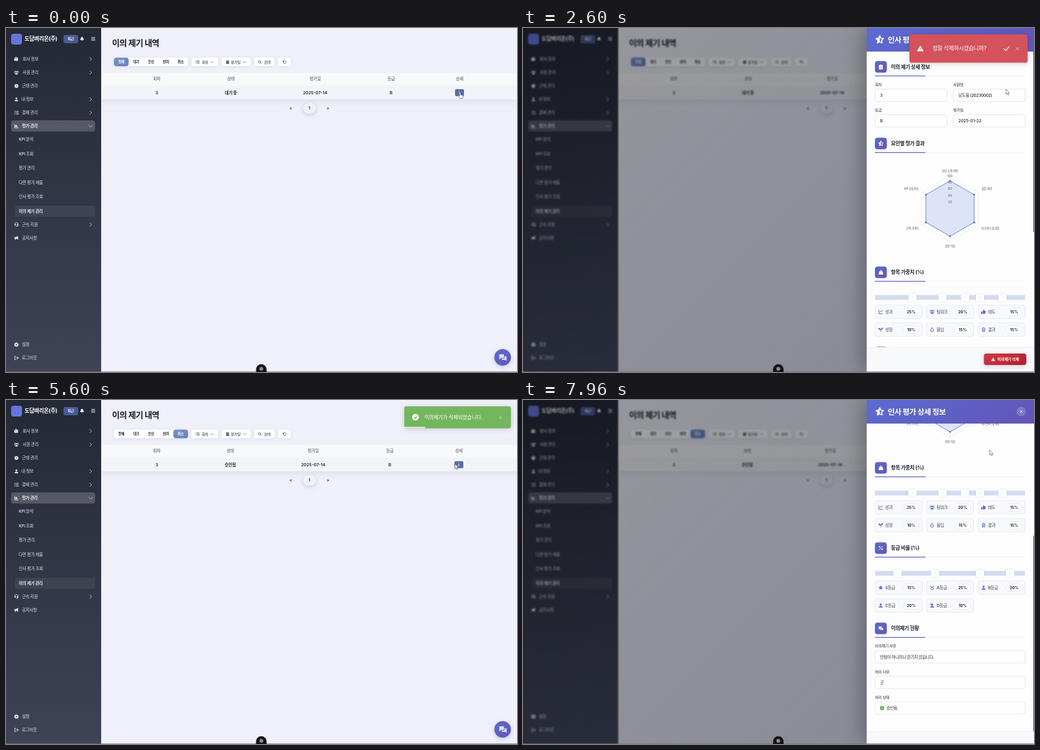
Animation of 800 by 540 pixels, one loop 8 s. Source, as an HTML page:

```html
<!DOCTYPE html>
<html lang="ko">
<head>
<meta charset="utf-8">
<title>이의 제기 내역</title>
<style>
html, body { margin: 0; width: 100%; height: 100%; overflow: hidden; background: #eff0f9; }
.stage { position: relative; width: 100%; height: 100%; overflow: hidden; contain: strict; }
svg, .dim { position: absolute; left: 0; top: 0; }
text { font-family: Inter, 'Noto Sans CJK KR', 'Noto Sans CJK', 'Noto Sans CJK JP', sans-serif; white-space: pre; }
.ko { letter-spacing: -.04em; }
.l { fill: none; stroke: currentColor; stroke-width: 2; stroke-linecap: round; stroke-linejoin: round; }
.soft { filter: drop-shadow(0 1px 2px rgba(40, 50, 90, .1)); }
.knob { filter: drop-shadow(0 .5px 1px rgba(40, 50, 90, .2)); }
.lift { filter: drop-shadow(0 2px 3px rgba(40, 50, 90, .2)); }
.wide { filter: drop-shadow(0 4px 5px rgba(40, 50, 90, .09)); }
.toast { filter: drop-shadow(0 1px 4px rgba(0, 0, 0, .16)); }
.dim { width: 800px; height: 540px; background: linear-gradient(135deg, rgba(0, 0, 0, .37), rgba(20, 26, 40, .48)); backdrop-filter: blur(1.3px); }
.panel { left: 538px; box-shadow: -6px 0 30px rgba(0, 0, 0, .3); }

/* one 8 s clock: 1% = 80 ms */
.dim, .panel, .scroll, .thumb, .ask, .done, .bar, .cursor { animation: 8s infinite both; }
.dim { animation-name: dim; }
.panel { animation-name: panel; }
.scroll { animation-name: scroll; animation-timing-function: ease-in-out; }
.thumb { animation-name: thumb; animation-timing-function: ease-in-out; }
.ask { animation-name: ask; }
.done { animation-name: done; }
.bar { animation-name: bar; animation-timing-function: linear; transform-box: fill-box; transform-origin: left; }
.cursor { animation-name: move; animation-timing-function: ease-in-out; }
.rowA, .rowNone, .rowB, .all, .cancel, .first, .second, .hand, .arrow, .beam { animation: 8s step-end infinite both; }
.rowA { animation-name: rowA; }
.rowNone { animation-name: rowNone; }
.rowB { animation-name: rowB; }
.all { animation-name: all; }
.cancel { animation-name: cancel; }
.first { animation-name: first; }
.second { animation-name: second; }
.hand { animation-name: hand; }
.arrow { animation-name: arrow; }
.beam { animation-name: beam; }

@keyframes dim {
  0%, 1.5% { opacity: 0; } 4.75%, 39.6% { opacity: 1; }
  42.5%, 73.3% { opacity: 0; } 76.2%, 100% { opacity: 1; }
}
@keyframes panel {
  0%, 1.5% { transform: translateX(310px); } 4.75%, 39.6% { transform: none; }
  42.5%, 73.3% { transform: translateX(310px); } 76.2%, 100% { transform: none; }
}
@keyframes scroll {
  0%, 80% { transform: none; } 85%, 86.5% { transform: translateY(-202px); }
  89.5%, 100% { transform: translateY(-277px); }
}
@keyframes thumb {
  0%, 80% { transform: none; } 85%, 86.5% { transform: translateY(128px); }
  89.5%, 100% { transform: translateY(176px); }
}
@keyframes ask {
  0%, 22.25% { opacity: 0; transform: translateX(1560px); animation-timing-function: cubic-bezier(.215, .61, .355, 1); }
  27.9% { opacity: 1; transform: translateX(-13px); }
  29.3% { transform: translateX(5px); } 30.7% { transform: translateX(-2.6px); }
  31.6%, 39.25% { opacity: 1; transform: none; } 43% { opacity: 1; transform: translateX(-10px); }
  48.6%, 100% { opacity: 0; transform: translateX(520px); }
}
@keyframes done {
  0%, 39.875% { opacity: 0; transform: translateX(1560px); animation-timing-function: cubic-bezier(.215, .61, .355, 1); }
  45.5% { opacity: 1; transform: translateX(-13px); }
  46.9% { transform: translateX(5px); } 48.3% { transform: translateX(-2.6px); }
  49.25%, 77.375% { opacity: 1; transform: none; } 81.1% { opacity: 1; transform: translateX(-10px); }
  86.75%, 100% { opacity: 0; transform: translateX(520px); }
}
@keyframes bar { 0%, 39.875% { transform: none; } 77.375%, 100% { transform: scaleX(0); } }
@keyframes move {
  0%, 10% { transform: translate(711px, 101px); } 18.5%, 22.25% { transform: translate(750px, 527px); }
  36%, 39% { transform: translate(757px, 30px); animation-timing-function: ease-in; }
  43% { transform: translate(676px, 75px); animation-timing-function: ease-out; }
  57.5%, 61% { transform: translate(281px, 55px); } 71% { transform: translate(711px, 101px); }
  75%, 77% { transform: translate(712px, 102px); } 85%, 89% { transform: translate(704.5px, 164px); }
  96%, 100% { transform: translate(730.5px, 78.5px); }
}
@keyframes rowA { 0% { opacity: 1; } 40%, 100% { opacity: 0; } }
@keyframes rowNone { 0% { opacity: 0; } 40% { opacity: 1; } 61.5%, 100% { opacity: 0; } }
@keyframes rowB { 0% { opacity: 0; } 61.5%, 100% { opacity: 1; } }
@keyframes all { 0% { opacity: 1; } 59.75%, 100% { opacity: 0; } }
@keyframes cancel { 0% { opacity: 0; } 59.75%, 100% { opacity: 1; } }
@keyframes first { 0% { opacity: 1; } 50%, 100% { opacity: 0; } }
@keyframes second { 0% { opacity: 0; } 50%, 100% { opacity: 1; } }
@keyframes hand {
  0% { opacity: 1; } 3.75% { opacity: 0; } 18.1% { opacity: 1; } 23.75% { opacity: 0; } 35.6% { opacity: 1; }
  41.25% { opacity: 0; } 56.25% { opacity: 1; } 61.9% { opacity: 0; } 70.6% { opacity: 1; } 76.1%, 100% { opacity: 0; }
}
@keyframes arrow {
  0% { opacity: 0; } 3.75% { opacity: 1; } 18.1% { opacity: 0; } 23.75% { opacity: 1; } 35.6% { opacity: 0; }
  41.25% { opacity: 1; } 56.25% { opacity: 0; } 61.9% { opacity: 1; } 70.6% { opacity: 0; } 79.4%, 100% { opacity: 1; }
}
@keyframes beam { 0% { opacity: 0; } 76.1% { opacity: 1; } 79.4%, 100% { opacity: 0; } }
</style>
</head>
<body>
<script>
const line = d => `<path class="l" d="${d}"/>`;
const fill = d => `<path d="${d}"/>`;
const person = 'M8 1a3.6 3.6 0 1 1 0 7.2A3.6 3.6 0 0 1 8 1M1.5 15q0-5.5 4.5-5.5h4q4.5 0 4.5 5.5z';
const starPath = 'M8 .5l2.3 4.9 5.2.7-3.8 3.7 1 5.3L8 12.6l-4.7 2.5 1-5.3L.5 6.1l5.2-.7z';

const icons = {
  city: fill('M0 5h4V1h5v3h5v11H0z') + '<path d="M2 8h2M6 4h2M6 8h2M11 8h2" stroke="#2a2f3c" stroke-width="1.5"/>',
  users: '<circle cx="8" cy="5" r="3"/><circle cx="2.5" cy="3.5" r="2"/><circle cx="13.5" cy="3.5" r="2"/>' + fill('M3 15q0-6 5-6t5 6zM0 10q0-4 4-3.5L3 10zM16 10q0-4-4-3.5l1 3.5z'),
  clock: '<circle cx="8" cy="8" r="7"/><path d="M8 4v4l3 2" stroke="#2a2f3c" stroke-width="1.5" fill="none"/>',
  user: fill(person),
  list: line('M1 3l1 1 2-2M1 8l1 1 2-2M1.5 13h1M7 3h8M7 8h8M7 13h8'),
  chart: line('M1.5 1.5v13h13M5 11V7M8 11V4M11.5 11V9') + fill('M4 5h6v5H4z'),
  headset: line('M2 9V7a6 6 0 0 1 12 0v5q0 2.5-3 2.5H8') + fill('M2 7h4v5H2zM10 7h4v5h-4z'),
  horn: fill('M1 5h5l8-4v13l-8-4H5l1 5H3L2 10H1z'),
  gear: '<circle cx="8" cy="8" r="4.5" fill="none" stroke="currentColor" stroke-width="4"/><circle cx="8" cy="8" r="6.8" fill="none" stroke="currentColor" stroke-width="2.4" stroke-dasharray="3 2.34"/>',
  exit: line('M6 2H2v12h4M6 8h9M11 4l4 4-4 4'),
  bell: fill('M8 0q1 0 1 1.5Q13 3 13 8l2 4H1l2-4q0-5 4-6.5Q7 0 8 0M6 13h4q-2 4-4 0'),
  bars: line('M2 3h12M2 8h12M2 13h12'),
  right: line('M5 1l7 7-7 7'),
  down: line('M1 5l7 7 7-7'),
  calendar: fill('M2 2h12v13H2zM4 0h2v3H4zM10 0h2v3h-2z') + '<path d="M4 6h8M8 10h4" stroke="#fff" stroke-width="1.5"/>',
  search: line('M10.5 10.5L15 15M12 7A5 5 0 1 1 2 7a5 5 0 0 1 10 0'),
  redo: line('M2 2v5h5M2.5 7a6 6 0 1 1 1 5'),
  star: fill(starPath),
  halfStar: line(starPath) + fill('M8 .5v12.1l-4.7 2.5 1-5.3L.5 6.1l5.2-.7z'),
  close: line('M3 3l10 10M13 3L3 13'),
  check: line('M1 9l5 5L15 3'),
  clip: fill('M2 2h4q2-3 4 0h4v14H2z') + '<path d="M5 9l2 2 4-4" stroke="#5d60c4" stroke-width="1.8" fill="none"/>',
  weight: fill('M3 5h10l2.5 10H.5z') + line('M5.5 5q0-3.5 2.5-3.5T10.5 5'),
  percent: line('M13 3L3 13') + '<circle cx="4" cy="4" r="2.2"/><circle cx="12" cy="12" r="2.2"/>',
  chat: fill('M1 2h9v7H5l-4 3zM11 6h4v9l-3-2H6v-3h5z'),
  trend: line('M1.5 1.5v13h13M4 10l3-4 3 2 4-5'),
  thumb: fill('M0 7h4v8H0zM5 7l4-7q2 0 1.5 5H15q1 1 0 3l-1.5 6q-.5 1-2 1H5z'),
  sprout: fill('M7 15V9Q0 9 0 2q6 0 8 5 2-6 8-6 0 7-7 8v6z'),
  flame: line('M8 1q0 4 4 5 3 9-4 9t-4.5-8l2 1Q4 4 8 1') + '<circle cx="8" cy="11" r="1.5"/>',
  award: line('M13 6A5 5 0 1 1 3 6a5 5 0 0 1 10 0M5 10l-1 5 4-2 4 2-1-5') + '<circle cx="8" cy="6" r="2"/>',
  medal: line('M2 1l4 6M14 1l-4 6M12.5 11a4.5 4.5 0 1 1-9 0 4.5 4.5 0 0 1 9 0'),
  noUser: fill(person) + line('M1 1l14 14'),
  warn: fill('M8 1l8 14H0z') + '<path d="M8 6v4M8 12v1.5" stroke="#cc4650" stroke-width="1.8"/>',
  ok: '<circle cx="8" cy="8" r="8"/><path d="M4 8l3 3 5-5" stroke="#fff" stroke-width="2" fill="none"/>',
  done: '<circle cx="8" cy="8" r="8"/><path d="M4 8l3 3 5-5" stroke="#70b45a" stroke-width="2" fill="none"/>',
};

const icon = (name, x, y, size, color) =>
  `<g transform="translate(${x - size / 2} ${y - size / 2}) scale(${size / 16})" fill="currentColor" color="${color}">${icons[name]}</g>`;
const box = (x, y, w, h, r, color, more = '') =>
  `<rect x="${x}" y="${y}" width="${w}" height="${h}" rx="${r}" fill="${color}" ${more}/>`;
const text = (x, y, size, str, weight = 500, color = '#20242f', anchor = 'start') =>
  `<text x="${x}" y="${y + size * .36}" font-size="${size}" font-weight="${weight}" fill="${color}" text-anchor="${anchor}" class="${/[가-힣]/.test(str) ? 'ko' : ''}">${str}</text>`;
const mid = (x, y, size, str, weight, color) => text(x, y, size, str, weight, color, 'middle');
const group = (cls, ...parts) => `<g class="${cls}">${parts.join('')}</g>`;
const layer = (cls, x, w, body) =>
  `<svg class="${cls}" width="${w}" height="540" viewBox="${x} 0 ${w} 540">${body}</svg>`;
const gradient = (id, from, to, x2, y2) =>
  `<linearGradient id="${id}" x2="${x2}" y2="${y2}"><stop stop-color="${from}"/><stop offset="1" stop-color="${to}"/></linearGradient>`;

function sidebar() {
  const pale = '#e6e8ee';
  const menu = [
    ['city', 26, 48.5, '회사 정보', 'right'], ['users', 26, 70, '사원 관리', 'right'],
    ['clock', 25, 91, '근태 관리'], ['user', 24, 112, '내 정보', 'right'],
    ['list', 25, 133, '결재 관리', 'right'], ['chart', 25, 154, '평가 관리', 'down'],
    ['headset', 25, 308.5, '근속 지원', 'right'], ['horn', 25, 329.5, '공지사항'],
    ['gear', 25, 497, '설정'], ['exit', 25, 518, '로그아웃'],
  ].map(([name, x, y, label, arrow]) =>
    icon(name, 16.3, y, 7, pale) + text(x, y, 6.6, label, arrow === 'down' ? 700 : 500, pale) +
    (arrow ? icon(arrow, 132.5, y, 6, pale) : ''));
  const sub = ['KPI 분석', 'KPI 조회', '평가 관리', '다면 평가 제출', '인사 평가 조회', '이의 제기 관리']
    .map((s, i) => text(20, 175 + i * 22.45, 6.6, s, i === 5 ? 700 : 500, pale));
  return box(0, 0, 149, 540, 0, 'url(#side)') +
    box(8, 9, 17, 17, 4, '#6674dd') + text(29, 17, 8.6, '도담벼리온(주)', 700, '#fff') +
    box(90, 11, 23, 13, 3, '#485b95') + mid(101.5, 17.3, 5.5, '퇴근', 600, '#fff') +
    icon('bell', 119, 17, 7, '#fff') + icon('bars', 136.5, 17, 7, '#fff') +
    box(8, 145, 131.5, 17.5, 4, 'rgba(255,255,255,.2)') +
    box(14, 279, 125.5, 17.5, 3, 'rgba(255,255,255,.06)') + menu.join('') + sub.join('');
}

function filters() {
  const names = ['전체', '대기', '승인', '반려', '취소'], at = i => 180.5 + i * 23.25;
  const chosen = n => box(at(n) - 11.5, 46.5, 23, 13.5, 4, 'url(#pill)') + mid(at(n), 53.5, 5.4, names[n], 600, '#fff');
  const button = (x, w) => box(x, 46.5, w, 13.5, 3.5, '#fff', 'class="soft"');
  const dark = '#454a58';
  return box(168.5, 46.5, 116.5, 13.5, 4, '#fff', 'class="soft"') +
    names.map((s, i) => mid(at(i), 53.5, 5.4, s, 600)).join('') +
    group('all', chosen(0)) +
    group('cancel', box(169, 47, 23, 12.5, 4, '#fff') + mid(at(0), 53.5, 5.4, names[0], 600) + chosen(4)) +
    button(290.5, 41.5) + icon('list', 300, 53.5, 6, dark) + mid(311.5, 53.5, 5.8, '회차') + icon('down', 322.5, 53.5, 5, dark) +
    button(337.5, 45.5) + icon('calendar', 347, 53.5, 6, dark) + mid(359.5, 53.5, 5.8, '평가일') + icon('down', 373.5, 53.5, 5, dark) +
    button(388.5, 32) + icon('search', 397.5, 53.5, 6, dark) + mid(409, 53.5, 5.8, '검색') +
    button(426, 20) + icon('redo', 436, 53.5, 6, dark);
}

function table(cls, columns, status) {
  const heads = ['회차', '상태', '평가일', '등급', '상세'].map((s, i) => mid(columns[i], 80, 6.6, s, 500, '#4a4e5a'));
  const cells = status ? ['3', status, '2025-07-14', 'B'].map((s, i) => mid(columns[i], 101.5, 6.6, s, 600)) : [];
  const row = !status ? '' : box(149, 90, 651, 22, 0, '#f3f4f9', 'class="wide"') +
    box(columns[4] - 7, 96, 14, 11, 2, '#5b6ca6') + mid(columns[4], 101.5, 6.5, 'i', 700, '#fff');
  const y = status ? 126 : 103.5;
  return group(cls, row, box(149, 70.5, 651, 19.5, 0, '#f8f9fb', status ? '' : 'class="wide"'), ...heads, ...cells,
    box(465, y - 8.5, 20, 17, 8.5, '#f0f1f7', 'class="lift"'),
    mid(446, y, 6.6, '&lt;', 600), mid(475, y, 6.6, '1', 600), mid(504, y, 6.6, '&gt;', 600));
}

const page = `<defs>
  ${gradient('side', '#242936', '#3f4355', 0, 1)}${gradient('pill', '#7692cb', '#6983bd', 1, 1)}
  ${gradient('head', '#5b6cd2', '#6257b9', 1, .2)}${gradient('mark', '#5c6acb', '#6256b8', 1, 1)}
  ${gradient('red', '#d23a46', '#b5222f', 1, .6)}</defs>` +
  box(149, 0, 651, 540, 0, '#eff0f9') + sidebar() +
  text(166, 23, 13, '이의 제기 내역', 700, '#191c28') + filters() +
  table('rowA', [236, 352, 484, 603, 710], '대기 중') +
  table('rowNone', [249.5, 373.5, 475, 576, 700]) +
  table('rowB', [236, 351, 481, 601, 709], '승인됨') +
  '<circle cx="777.5" cy="517" r="13" fill="url(#mark)" class="lift"/>' + icon('chat', 778, 517, 13, '#dfe3fa');

const section = (y, name, title) =>
  box(551, y - 9, 18.5, 18, 4, 'url(#mark)', 'class="soft"') + icon(name, 560.3, y, 8, '#fff') +
  text(576, y, 8, title, 700, '#20232f') +
  box(551, y + 14, 235, .6, 0, '#eceef5') + box(551, y + 13.6, 79, 1.2, 0, '#5d62c8');

const field = (x, y, w, label, value, inset = 8) =>
  text(x, y, 6, label, 500, '#262a35') + box(x + .3, y + 7, w, 19.5, 3.5, '#fefefe', 'stroke="#e0e3ec" stroke-width=".8"') +
  text(x + inset, y + 17, 6.4, value, 500, '#22262f');

function radar() {
  const cx = 668.5, cy = 283.4, full = 51.3, value = 43.5;
  const points = r => [...Array(6).keys()].map(i => [cx + r * Math.sin(i * Math.PI / 3), cy - r * Math.cos(i * Math.PI / 3)]);
  const hex = (r, more) => `<polygon points="${points(r).join(' ')}" ${more}/>`;
  const thin = 'fill="none" stroke="#e3e4ea" stroke-width=".5"';
  const labels = [['업무 수행 역량', 668.5, 224], ['협업 역량', 726, 252.5], ['자기관리 및 태도', 732, 314],
    ['성장 의지', 668.5, 342], ['조직 기여도', 610, 314], ['KPI 성과관리', 608, 252.5]];
  return hex(value, 'fill="rgba(95,125,224,.2)" stroke="#667fe0" stroke-width=".95"') +
    [1, 2, 3, 4, 5].map(i => hex(full * i / 5, thin)).join('') +
    points(full).map(p => `<path d="M${cx} ${cy}L${p}" ${thin}/>`).join('') +
    [20, 40, 60, 80, 100].map(n => mid(cx, cy - full * n / 100, 5, n, 400, '#555')).join('') +
    points(value).map(([x, y]) => `<circle cx="${x}" cy="${y}" r="1.6" fill="#607ade"/>`).join('') +
    labels.map(([s, x, y]) => mid(x, y, 4.3, s, 400, '#555')).join('');
}

function weights(y, items) {
  let sum = 0;
  const handles = items.slice(0, -1).map(([, , n]) => {
    const x = 551 + 2.35 * (sum += n);
    return box(x - 6.5, y - 5.5, 13, 11.5, 2.5, '#fff', 'class="knob"') + box(x - .8, y - 2, 1.6, 4, 0, '#eceef3');
  });
  const cards = items.map(([name, label, n], i) => {
    const x = 551 + i % 3 * 80.5, cy = y + 22.5 + (i > 2 ? 28 : 0);
    return box(x + .3, cy - 10.5, 73.7, 21, 4, '#f8f9fd', 'stroke="#e2e5f0" stroke-width=".8"') +
      icon(name, x + 9, cy, 7.5, '#5f70c6') + text(x + 16, cy, 6.6, label, 500, '#3c414e') +
      box(x + 44.5, cy - 6, 24.5, 12, 6, '#fff', 'stroke="#e2e5f0" stroke-width=".7"') + mid(x + 56.8, cy, 6, n + '%', 700);
  });
  return box(551, y - 3.7, 235, 7.4, 1, '#d4dcef') + handles.join('') + cards.join('');
}

const details =
  section(61, 'clip', '이의 제기 상세 정보') +
  field(551, 89, 112.5, '회차', '3') + field(673.5, 89, 112.5, '사원명', '남도율 (20230002)') +
  field(551, 129, 112.5, '등급', 'B') + field(673.5, 129, 112.5, '평가일', '2025-01-22') +
  section(181.3, 'halfStar', '요인별 평가 결과') + radar() +
  section(383.4, 'weight', '항목 가중치 (%)') +
  weights(423, [['trend', '성과', 25], ['users', '팀워크', 20], ['thumb', '태도', 15],
    ['sprout', '성장', 10], ['flame', '몰입', 15], ['award', '결과', 15]]) +
  section(509.4, 'percent', '등급 비율 (%)') +
  weights(549, [['star', 'S등급', 15], ['medal', 'A등급', 25], ['user', 'B등급', 30],
    ['user', 'C등급', 20], ['noUser', 'D등급', 10]]) +
  section(635.4, 'chat', '이의제기 현황') +
  field(551, 663.3, 235, '이의제기 사유', '만점이 아니라니 믿기지 않습니다.') +
  field(551, 703.5, 235, '처리 사유', '굿') +
  field(551, 743.7, 235, '처리 상태', '승인됨', 18) + icon('ok', 562, 760.8, 6.5, '#58b04a');

const footer = y => box(538, y, 262, 540 - y, 0, '#f8f9fc') + box(538, y, 262, .7, 0, '#e8eaf0');
const scrollbar = height => box(799, 37, 1, height, 0, '#4a4c53');
const panel = box(538, 0, 262, 540, 0, '#fdfdfe') + group('scroll', details) +
  group('first', scrollbar(283), footer(501),
    box(721.5, 511, 66.5, 18, 4, 'url(#red)', 'class="lift"'), icon('warn', 736, 520, 6.5, '#fff'),
    text(742.5, 520, 6.2, '이의제기 삭제', 700, '#fff')) +
  group('second', group('thumb', scrollbar(307)), footer(520)) +
  box(538, 0, 262, 37, 0, 'url(#head)') + icon('halfStar', 558.5, 18, 12.5, '#fff') +
  text(571, 18.3, 11.9, '인사 평가 상세 정보', 700, '#fff') +
  '<circle cx="780" cy="18" r="7.5" fill="rgba(255,255,255,.2)"/>' + icon('close', 780, 18, 6, '#fff');

const overlay =
  group('done', group('toast', box(623.5, 10, 167, 34.5, 3, '#74b65d')), icon('done', 641, 27, 10.5, '#fff'),
    text(655, 27, 8.2, '이의제기가 삭제되었습니다.', 400, '#fff'), icon('close', 774, 27.5, 7, 'rgba(255,255,255,.55)'),
    box(623.5, 42, 167, 2.5, 0, 'rgba(255,255,255,.7)', 'class="bar"')) +
  group('ask', group('toast', box(605, 10, 185, 44.5, 3, '#d3525c')), icon('warn', 622, 32, 10.5, '#fff'),
    text(641, 32, 8.9, '정말 삭제하시겠습니까?', 400, '#fff'), icon('check', 757, 32, 9.5, '#fff'),
    icon('close', 774, 32.5, 7, 'rgba(255,255,255,.6)')) +
  box(0, 539.3, 800, .7, 0, '#6f727c') +
  '<path d="M391.5 540v-4a8.2 8.2 0 0 1 16.4 0v4z" fill="#121315" class="soft"/><circle cx="399.7" cy="535" r="3" fill="#8b8d90"/>' +
  group('cursor',
    '<path class="arrow" d="M0 0v8l1.9-1.7 1.3 2.9 1.2-.5-1.3-2.8h2.6z" fill="#fff" stroke="#333" stroke-width=".55"/>',
    '<path class="hand" d="M-.9.8a.9.9 0 0 1 1.8 0v3l3 .7q1 .3.9 1.4l-.5 2.6q-.2 1-1.2 1h-3q-.8 0-1.3-.7L-3 6q-.5-.9.3-1.2.6-.2 1.1.3l.7.7z" fill="#fff" stroke="#333" stroke-width=".6"/>',
    '<path class="beam" d="M-1.8-4Q0-4 0-3Q0-4 1.8-4M0-3V3M-1.8 4Q0 4 0 3Q0 4 1.8 4" fill="none" stroke="#222" stroke-width=".9"/>');

document.body.innerHTML = '<div class="stage">' + layer('page', 0, 800, page) + '<div class="dim"></div>' +
  layer('panel', 538, 262, panel) + layer('overlay', 0, 800, overlay) + '</div>';
</script>
</body>
</html>
```
